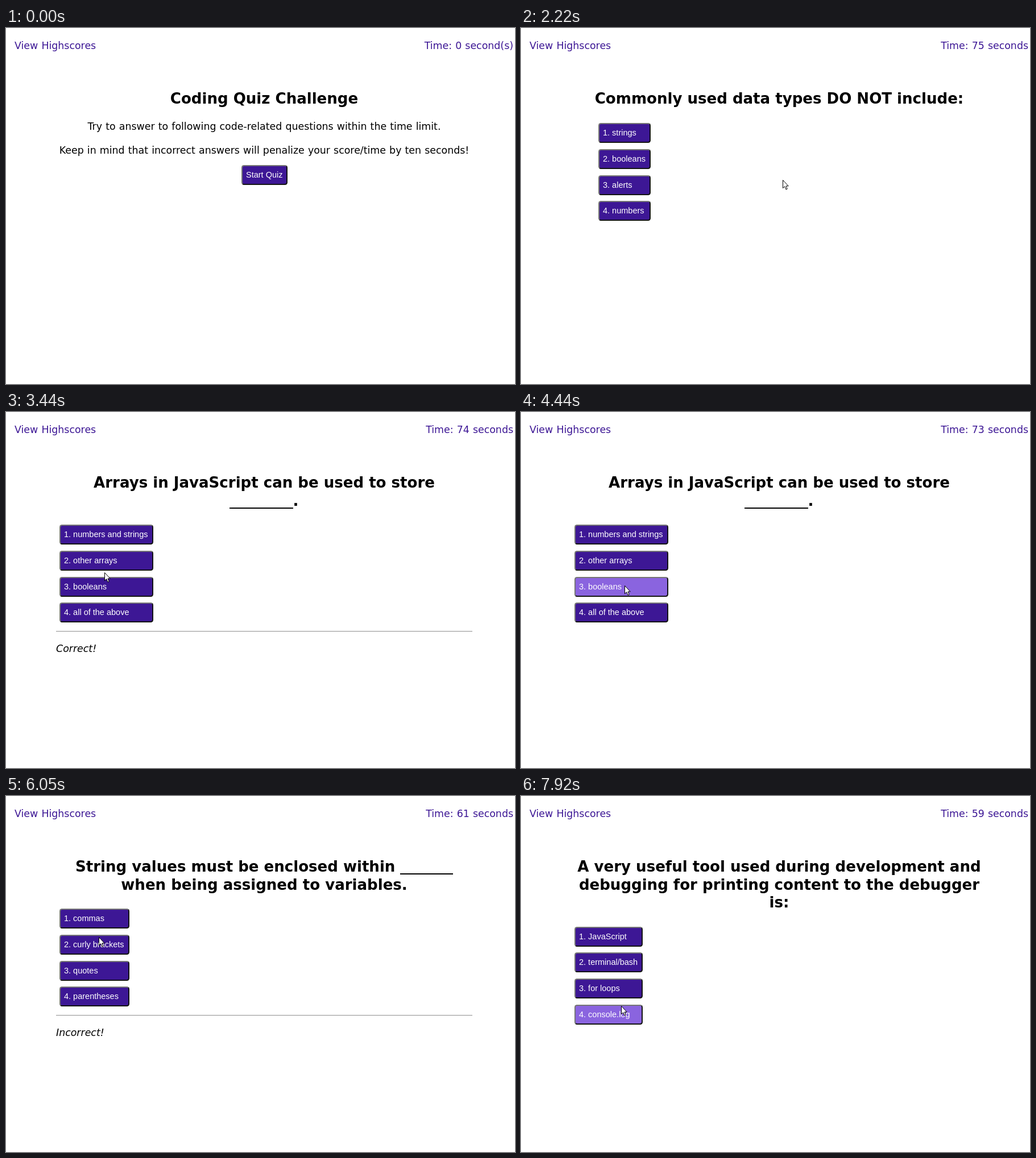
An HTML page that plays this animation: 895x626 px, repeating every 8000 ms.

```html
<!DOCTYPE html>
<html lang="en">
<head>
<meta charset="utf-8">
<title>Coding Quiz</title>
<style>
  html, body { margin: 0; width: 100%; height: 100%; overflow: hidden; background: #fff; }
  body {
    position: relative; color: #000; font-kerning: none;
    font: 17.4px/20px "DejaVu Sans", sans-serif; word-spacing: .034em;
  }
  body > *, #page > * { position: absolute; margin: 0; white-space: pre; }
  #scores, #time { top: 21px; color: #3d1795; }
  #scores { left: 15px; }
  #time { right: 3px; }
  h2, p { left: 0; width: 908px; text-align: center; }
  h2 { top: 109px; font: bold 26.05px/31.6px "DejaVu Sans", sans-serif; word-spacing: 0; }
  .blank { display: inline-block; height: 2px; background: #000; vertical-align: -.19em; }
  .choices { display: grid; gap: 10.7px; }
  button {
    box-sizing: border-box; height: 35px; margin: 0; padding: 0 7px 1px 6.5px;
    border: 2px solid; border-color: #767676 #151515 #151515 #767676; border-radius: 4.4px;
    background: #3d1795; color: #fff; text-align: left;
    font: 14.5px "Liberation Sans", Arial, sans-serif;
  }
  button.hover { background: #8a64df; }
  button.pressed { box-shadow: 0 0 14px rgba(0, 0, 0, .1), 0 -16px 14px rgba(0, 0, 0, .08); }
  hr { left: 88px; width: 732px; height: 1px; border: 0; border-top: 1px solid #9a9a9a; background: #eee; }
  em { left: 88px; }
  #cursor { left: 0; top: 0; overflow: visible; }
</style>
</head>
<body>
<div id="scores">View Highscores</div>
<div id="time"></div>
<div id="page"></div>
<svg id="cursor" width="12" height="19">
  <path d="M.5 .5V14.6L3.7 11.6 6 17 8.2 16 6 10.9H10.2Z" fill="#fff" stroke="#000"/>
</svg>
<script>
const LOOP = 8000, LINE = 31.2, HOVER_LAG = 40, PRESS = 160, FEEDBACK = 1000;
const $ = id => document.getElementById(id);
const blank = count => `<span class="blank" style="width:${count * .711}em"></span>`;

const questions = [
  { at: 1760, left: 135.5, title: ["Commonly used data types DO NOT include:"],
    choices: ["strings", "booleans", "alerts", "numbers"] },
  { at: 3440, title: ["Arrays in JavaScript can be used to store", blank(6) + "."],
    choices: ["numbers and strings", "other arrays", "booleans", "all of the above"], feedback: "Correct!" },
  { at: 5150, title: ["String values must be enclosed within " + blank(5), "when being assigned to variables."],
    choices: ["commas", "curly brackets", "quotes", "parentheses"], feedback: "Incorrect!" },
  { at: 6860,
    title: ["A very useful tool used during development and", "debugging for printing content to the debugger", "is:"],
    choices: ["JavaScript", "terminal/bash", "for loops", "console.log"], feedback: "Correct!" }
];

// Each stroke bends towards a control point and starts where the last one ended.
const strokes = [
  { from: 350, to: 1180, bend: [390, 400], end: [460, 267] },
  { from: 2220, to: 2950, bend: [330, 300], end: [173, 282] },
  { from: 4250, to: 4990, bend: [205, 370], end: [165, 228] },
  { from: 5790, to: 6420, bend: [160, 244], end: [166, 319] },
  { from: 7520, to: 7700, bend: [168, 350], end: [176, 369] }
];

function pointer(t) {
  let tip = [799, 640];
  for (const { from, to, bend, end } of strokes) {
    const u = Math.min(1, Math.max(0, (t - from) / (to - from)));
    const k = u * u * (3 - 2 * u);
    tip = tip.map((start, i) => (1 - k) ** 2 * start + 2 * k * (1 - k) * bend[i] + k * k * end[i]);
  }
  return tip;
}

function clock(t) {
  if (t < questions[0].at) return "0 second(s)";
  const ticks = Math.max(0, Math.floor((t - 1790) / 1021));
  const penalty = t >= questions[2].at ? 10 : 0;
  return `${75 - ticks - penalty} seconds`;
}

const intro = `<h2>Coding Quiz Challenge</h2>
<p style="top:163px">Try to answer to following code-related questions within the time limit.</p>
<p style="top:205px">Keep in mind that incorrect answers will penalize your score/time by ten seconds!</p>
<button style="left:413.5px;top:241px">Start Quiz</button>`;

function questionPage({ left = 93.5, title, choices, feedback }, showFeedback) {
  const shift = LINE * (title.length - 1);
  const buttons = choices.map((text, i) => `<button>${i + 1}. ${text}</button>`).join("");
  return `<h2>${title.join("<br>")}</h2>
    <div class="choices" style="left:${left}px;top:${167.2 + shift}px">${buttons}</div>` +
    (showFeedback ? `<hr style="top:${353.6 + shift}px"><em style="top:${375 + shift}px">${feedback}</em>` : "");
}

let shown = "";
function draw(now) {
  const t = now % LOOP;
  const question = questions.findLast(q => q.at <= t);
  const html = question ? questionPage(question, question.feedback && t < question.at + FEEDBACK) : intro;
  if (html !== shown) $("page").innerHTML = shown = html;
  $("time").textContent = "Time: " + clock(t);

  const [x, y] = pointer(t).map(Math.round);
  $("cursor").style.transform = `translate(${x}px, ${y}px)`;
  const [hx, hy] = pointer(t - HOVER_LAG);
  const down = questions.some(q => t >= q.at - PRESS && t < q.at);
  for (const button of document.querySelectorAll("button")) {
    const box = button.getBoundingClientRect();
    const over = hx >= box.left && hx < box.right && hy >= box.top && hy < box.bottom;
    button.className = over ? (down ? "hover pressed" : "hover") : "";
  }
  requestAnimationFrame(draw);
}
draw(0);
</script>
</body>
</html>
```
